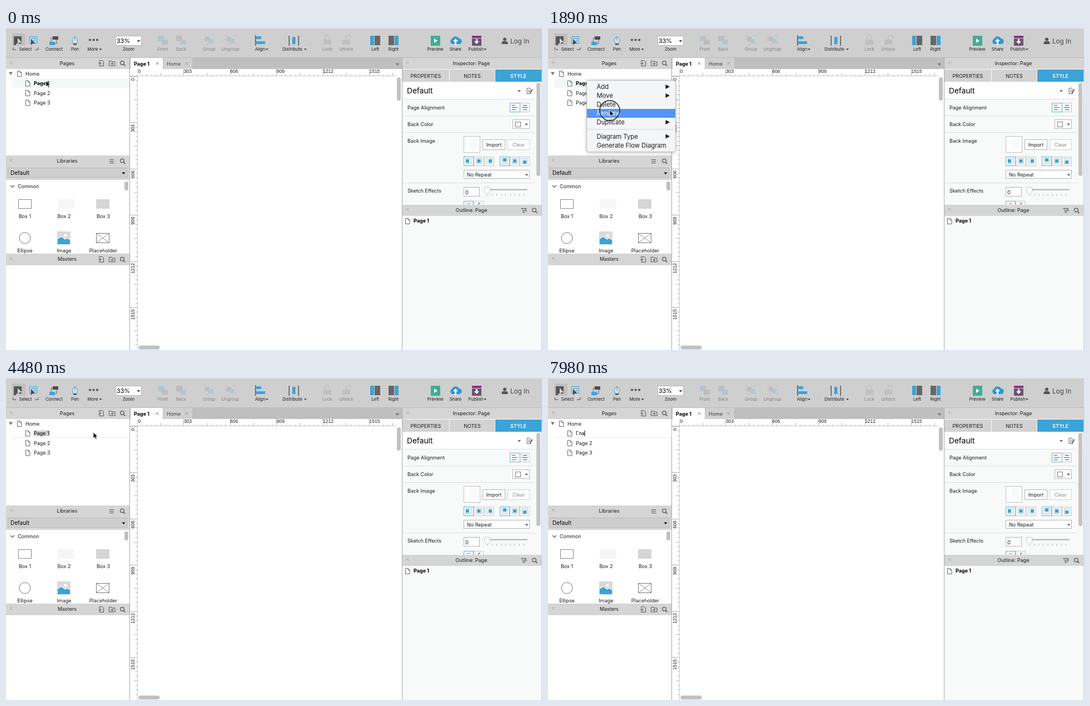
Write an HTML page that moves like this. It is 964 px wide and 581 px high and loops after 8 s.

```html
<!DOCTYPE html>
<html lang="en">
<head>
<meta charset="utf-8">
<title>Renaming a page</title>
<style>
  html, body { margin: 0; width: 100%; height: 100%; overflow: hidden; background: #fff; }
  svg { display: block; width: 964px; height: 581px; }
  text { font-family: Inter, "Open Sans", sans-serif; white-space: pre; }
  .ruler { font-family: "Liberation Sans", Arial, sans-serif; }
</style>
</head>
<body>
<svg id="stage" viewBox="0 0 964 581"></svg>
<script>
const INK = '#1c1c1c', BLUE = '#3ca3d7', BAND = '#d5d5d5', LINE = '#dedede', PANEL = '#f8f9f9';

const rect = (x, y, w, h, fill, extra = '') => `<rect x="${x}" y="${y}" width="${w}" height="${h}" fill="${fill}" ${extra}/>`;
const box = (x, y, w, h, fill, stroke, extra = '') => rect(x + .5, y + .5, w - 1, h - 1, fill, `stroke="${stroke}" ${extra}`);
const path = (d, stroke, width = 1, fill = 'none', extra = '') => `<path d="${d}" stroke="${stroke}" stroke-width="${width}" fill="${fill}" ${extra}/>`;
const shape = (d, fill) => `<path d="${d}" fill="${fill}"/>`;
const text = (x, y, s, size = 9, fill = INK, extra = '') => `<text x="${x}" y="${y}" font-size="${size}" fill="${fill}" ${extra}>${s}</text>`;
const mid = (x, y, s, size, fill, extra = '') => text(x, y, s, size, fill, `text-anchor="middle" ${extra}`);
const bold = (x, y, s) => text(x, y, s, 9, '#000', 'font-weight="700"');
const down = (x, y, w = 3, fill = '#444') => shape(`M${x - w} ${y - w / 2}h${2 * w}l${-w} ${w * 1.2}z`, fill);
const group = (body, extra) => `<g ${extra}>${body}</g>`;

const pageIcon = (x, y) => path(`M${x + .5} ${y + .5}h4.5l3 3v7h-7.5zM${x + 5} ${y + .5}v3h3`, '#666', 1, '#fff');
const search = (x, y) => `<circle cx="${x}" cy="${y}" r="3.3" fill="none" stroke="#555" stroke-width="1.3"/>` + path(`M${x + 2.5} ${y + 2.5}l3 3`, '#555', 1.6);
const collapse = (x, y) => path(`M${x + 5} ${y + 5}l-4.5 -4.5M${x} ${y + 4}v-4h4`, '#b0b0b0');
const addPage = (x, y) => path(`M${x + 2} ${y + 4}v-3.5h5l2.5 2.5v7.5h-7.5v-2M${x} ${y + 6}h6M${x + 3} ${y + 3.5}v5`, '#555');
const addFolder = (x, y) => path(`M${x + .5} ${y + 1.5}h4l1 1.5h5.5v7h-10.5zM${x + 3.5} ${y + 6.5}h5M${x + 6} ${y + 4}v5`, '#555');
const header = (x, y, w, h, title, cx) => rect(x, y, w, h, BAND) + mid(cx, y + 13, title, 9) + collapse(x + 8, y + 7);
const label = (x, s, fill = INK) => mid(x, 41, s, 7.8, fill);
const pointer = (x, y, fill) => shape(`M${x} ${y}v11l3 -3h4.5z`, fill);

function toolbar() {
  const dim = '#858585', paleBlue = '#b3c6d0', paleGray = '#bdbdbd';
  const stacked = (x, front) => rect(x - 9, 14, 11, 10, front ? paleBlue : paleGray) + rect(x - 2, 21, 11, 9, front ? paleGray : paleBlue);
  const cluster = x => rect(x - 7, 16, 8, 8, paleGray) + rect(x - 1, 20, 8, 8, paleBlue) +
    path(`M${x - 9} 14h18v16h-18z`, '#b8b8b8', 1, 'none', 'stroke-dasharray="3 12"');
  const lock = (x, open) => rect(x - 7, 21, 14, 9, '#c0c0c0') +
    path(`M${x - 4 + open} 21v-4a4 4 0 0 1 8 0v${4 - open / 2}`, '#c0c0c0', 1.5);
  const pane = (x, w, a, b) => rect(x, 14, w, 17, a) + rect(x + w + 1, 14, 17 - w, 17, b);
  return rect(0, 0, 964, 54, '#cfcfcf') + rect(0, 0, 964, 1, '#e4e4e4') + rect(0, 53, 964, 1, '#bababa') +
    rect(11, 10, 24, 22, '#c0c0c0', 'rx="2"') + rect(14, 15, 14, 13, '#555') + pointer(21, 18, '#d5d5d5') + rect(14, 28, 4, 3, '#555') +
    box(42, 15, 14, 13, '#c4d9e3', BLUE) + box(46, 18, 7, 6, 'none', BLUE) + pointer(45, 20, '#444') +
    path('M12.5 35v4h6M52 39h6v-4', '#444') + label(35, 'Select') +
    rect(84, 15, 10, 6, '#4d4d4d') + rect(78, 25, 10, 6, BLUE) + path('M84 18h-2.5v7M88 28h3v-7', '#666') + label(86.5, 'Connect') +
    path('M120.5 28l-1.5 -7 5 -6 5 6 -1.5 7zM124 16v7', BLUE, 1, '#d9e2e6') + rect(121, 28, 6, 2.5, '#555') + label(124, 'Pen') +
    [151, 157.5, 164].map(x => `<circle cx="${x}" cy="21.5" r="2.1" fill="#555"/>`).join('') + label(156, 'More') + down(170, 38.5, 2.5) +
    box(197, 14, 47, 18, '#fff', '#b5b5b5') + text(199, 27, '33%', 10.8, '#000') + down(238.5, 23.5, 3) + label(220.5, 'Zoom') +
    stacked(282, true) + label(282, 'Front', dim) + stacked(315, false) + label(315, 'Back', dim) +
    cluster(365) + label(365, 'Group', dim) + cluster(404) + label(403.5, 'Ungroup', dim) +
    rect(448, 13, 1.5, 19, '#555') + rect(450, 15, 9, 5, BLUE) + rect(450, 24, 16, 5, BLUE) + label(457, 'Align') + down(469.5, 38.5, 2.5) +
    rect(508.5, 14, 1.5, 18, '#555') + rect(525.5, 14, 1.5, 18, '#555') + rect(515, 16, 5.5, 13, BLUE) + label(515, 'Distribute') + down(538.5, 38.5, 2.5) +
    lock(578, 0) + label(578, 'Lock', dim) + lock(612, 4) + label(612, 'Unlock', dim) +
    pane(655, 7, BLUE, '#666') + label(664, 'Left') + pane(688, 10, '#666', BLUE) + label(697, 'Right') +
    rect(764, 14, 17, 18, '#3fae95') + shape('M770 19v8l6 -4z', '#fff') + label(772, 'Preview') +
    shape('M803 29a5 5 0 0 1 -.5 -9.5 6.5 6.5 0 0 1 12 -.5 5 5 0 0 1 .5 10z', '#2f97d3') + shape('M808.5 19l4.5 5h-3v7h-3v-7h-3z', '#fff') + label(808.5, 'Share') +
    rect(838, 14, 17, 4, '#92278f') + rect(838, 19, 17, 13, '#6a5370') + shape('M846.5 29l-4.5 -5h3v-4h3v4h3z', '#fff') + label(845, 'Publish') + down(861.5, 38.5, 2.5) +
    `<circle cx="897" cy="20.5" r="3" fill="#555"/>` + shape('M891.5 29v-2q0 -3 3 -3h5q3 0 3 3v2z', '#555') + text(907, 28, 'Log In', 11.7, '#444');
}

function leftPanels() {
  const tools = y => addPage(166, y + 4) + addFolder(185, y + 4) + search(209, y + 9);
  const items = [[34, 'Box 1', 'Ellipse'], [104.5, 'Box 2', 'Image'], [175, 'Box 3', 'Placeholder']];
  return rect(0, 54, 222, 527, '#fff') +
    header(0, 54, 222, 20, 'Pages', 110) + tools(54) +
    shape('M5 79.5h7l-3.5 5.5z', '#777') + pageIcon(20, 77) + text(35, 85.5, 'Home') +
    pageIcon(35, 112) + text(50, 120.5, 'Page 2') + pageIcon(35, 129.5) + text(50, 138, 'Page 3') +
    rect(0, 230, 222, 44, BAND) + header(0, 230, 222, 20, 'Libraries', 110) +
    path('M186 237.5h8M186 240.5h8M186 243.5h8', '#555') + search(209, 239.5) +
    box(3, 252, 215, 18, '#cecece', '#b8b8b8') + text(8, 265, 'Default', 10, '#000') + down(211.5, 262, 3, '#000') +
    path('M8 284l3.5 3.5 3.5 -3.5', '#555', 1.2) + text(21, 289, 'Common') +
    rect(213, 277, 7, 16, '#c1c1c1', 'rx="3"') +
    box(22, 309, 24, 17, '#fff', '#888') + rect(93, 309, 30, 17, '#f6f6f6') + rect(162, 309, 24, 17, '#d5d5d5') +
    `<circle cx="34" cy="379" r="10" fill="#fff" stroke="#777"/>` +
    rect(92, 367, 24, 24, '#d9d9d9') + `<circle cx="107" cy="374" r="2.6" fill="#fff"/>` +
    shape('M93 380l7 -4 6 5 4 -2 5 3v8h-22z', BLUE) + path('M93 380l7 -4 6 5 4 -2 5 3', '#fff', 1.3) +
    box(162, 370, 24, 18, '#fff', '#777') + path('M162.5 370.5l23 17M185.5 370.5l-23 17', '#777', .8) +
    items.map(([x, a, b]) => mid(x, 343, a, 9) + mid(x, 405, b, 9)).join('') +
    header(0, 407, 222, 21, 'Masters', 110) + tools(408) +
    rect(222, 54, 1, 527, '#a8a8a8');
}

function editor() {
  const unit = 83.4, major = [0, 1, 2, 3, 4, 5];
  let ticksX = '', ticksY = '';
  for (let i = 0; i < 60; i++) {
    const size = i % 10 === 0 ? 13 : i % 5 === 0 ? 6 : 3, at = i * unit / 10;
    if (at < 465) ticksX += `M${236.5 + Math.round(at)} 87v${-size}`;
    if (at < 488) ticksY += `M236 ${87.5 + Math.round(at)}h${-size}`;
  }
  return rect(223, 54, 490, 527, '#fff') + rect(223, 54, 490, 20, '#bfbfbf') +
    rect(224, 54, 58, 20, '#fff') + bold(230, 67.5, 'Page 1') + path('M269.5 61.5l5 5M274.5 61.5l-5 5', '#888') +
    rect(283, 54, 52, 20, '#d0d0d0') + text(289, 67.5, 'Home', 9, '#444') + path('M322 61.5l5 5M327 61.5l-5 5', '#999') +
    down(704, 65.5, 3.5, '#777') +
    path(ticksX + ticksY, '#b0b0b0') + path('M223 86.5h480M236.5 74v507', '#c8c8c8') +
    major.map(i => text(237.5 + i * unit - (i ? 1 : 0), 81, i * 303, 8.5, INK, 'class="ruler"') +
      `<text class="ruler" text-anchor="end" font-size="8.5" fill="${INK}" transform="translate(231 ${90.5 + i * unit}) rotate(-90)">${i * 303}</text>`).join('') +
    rect(703, 89, 7, 42, '#c1c1c1', 'rx="3.5"') + rect(238.5, 573, 38, 7, '#c1c1c1', 'rx="3.5"') +
    rect(712, 54, 1, 527, '#a8a8a8');
}

function inspector() {
  const edge = on => on ? '#62b3dc' : '#c8c8c8';
  const tab = (x, w, s, on) => rect(x, 75, w, 22, on ? BLUE : '#d2d2d2') + mid(x + w / 2, 89.5, s, 9, on ? '#fff' : INK, on ? 'font-weight="600"' : '');
  const divider = y => rect(713, y, 238, 1, LINE);
  const pad = (x, y, dx, dy, on) => box(x, y, 18, 17, PANEL, edge(on)) +
    box(x + 4, y + 3, 10, 10, '#fff', '#a8c4d2') + rect(x + 6 + dx, y + 5 + dy, 6, 6, BLUE);
  const slots = [-2, 0, 2];
  let ticks = '';
  for (let x = 866.5; x < 935; x += 8.1) ticks += `M${x} 299v4`;
  return rect(713, 54, 251, 265, PANEL) + header(713, 54, 251, 20, 'Inspector: Page', 837) + rect(713, 97, 251, 31, '#fff') +
    tab(713, 84, 'PROPERTIES') + tab(798, 81, 'NOTES') + tab(880, 83, 'STYLE', true) +
    text(721, 117.5, 'Default', 13.7, '#000') + down(923, 113.5, 3, '#666') +
    path('M937 108.5h5l2 2v8h-7zM939 112h3M939 114.5h3', '#666') + path('M942 117l5 -6', '#444', 1.3) +
    [128, 158, 188, 279].map(divider).join('') +
    text(722, 147, 'Page Alignment') + text(722, 177, 'Back Color') + text(722, 207, 'Back Image') + text(722, 297, 'Sketch Effects') +
    box(924, 135, 18, 17, PANEL, edge()) + box(906, 135, 19, 17, PANEL, edge(true)) +
    path('M910 139.5h6M910 143.5h10M910 147.5h7', '#256f99') + path('M930 139.5h7M928 143.5h10M930 147.5h7', '#555') +
    box(911, 165, 31, 17, '#fff', '#b5b5b5') + box(916, 169, 10, 10, '#fff', '#777') + down(936, 174, 3, '#666') +
    box(823, 195, 30, 30, '#fff', '#c0c0c0') + rect(834, 200, 14, 18, PANEL) +
    box(857, 201, 41, 19, '#fff', '#b5b5b5') + mid(877.5, 214, 'Import', 9) +
    box(902, 201, 40, 19, '#fff', '#d2d2d2') + mid(922, 214, 'Clear', 9, '#8b8b8b') +
    slots.map((d, i) => pad(823 + i * 18.5, 232, d, 0, !i) + pad(888 + i * 18, 232, 0, d, !i)).join('') +
    box(823, 256, 119, 16, '#fff', '#b5b5b5') + text(829, 268, 'No Repeat') + down(936.5, 265, 3, '#666') +
    box(823, 287, 29, 17, '#fff', '#b5b5b5') + text(826, 299.5, '0', 9.5) +
    rect(860, 290.5, 78, 2.5, '#bdbdbd', 'rx="1"') + path(ticks, '#b5b5b5') +
    path('M860.5 287.5h10v8l-5 5.5 -5 -5.5z', '#c8c8c8', 1, '#fff') +
    box(823, 312, 18, 9, PANEL, edge(true)) + box(841, 312, 18, 9, PANEL, edge()) +
    path('M829 317.5q3 -3 6 0', '#3fae95') + path('M850 319v-3h3', '#555') +
    rect(954, 99, 7, 168, '#c4c4c4', 'rx="3.5"') +
    rect(713, 319, 251, 262, PANEL) + header(713, 319, 251, 20, 'Outline: Page', 837) +
    path('M927 325.5h8l-3 4v4l-2 -1v-3zM936 326l-2 4h3', '#555') + search(950, 328.5) +
    pageIcon(718, 343) + bold(733, 351, 'Page 1') + rect(963, 54, 1, 527, '#c8c8c8');
}

const MENU = [['Add', 106, 1], ['Move', 122, 1], ['Delete', 138], ['Rename', 154], ['Duplicate', 170, 1], ['Diagram Type', 195.5, 1], ['Generate Flow Diagram', 211.5]];

const menu = () => box(69, 94, 161, 130, '#f4f5f6', '#b9b9b9', 'rx="4" style="filter:drop-shadow(0 2px 3px #0003)"') +
  `<rect id="hover" x="70" width="159" height="16" fill="#5595f5"/>` + rect(70, 182.5, 159, 1, '#d4d4d4') +
  MENU.map(([name, y, more]) => group(text(87.5, y + 4, name, 11.3, 'currentColor') +
    (more ? shape(`M211.5 ${y - 4}l7.5 4 -7.5 4z`, 'currentColor') : ''), 'class="item"')).join('');

const $ = id => document.getElementById(id);
$('stage').innerHTML = toolbar() + leftPanels() +
  rect(11, 91, 211, 17, '#f4f7f8', 'id="row"') +
  group(rect(11, 91, 211, 17, '#fff') + rect(11, 107, 211, 1, '#e9e9e9') + rect(222, 92, 1, 16, '#9cc9e6'), 'id="field"') +
  pageIcon(35, 94.5) + rect(49.5, 94.5, 30, 10.5, '#d2d2d2', 'id="selection"') +
  `<text id="name" x="50" y="103" font-size="9"></text>` + rect(50, 94.5, 1, 10.5, '#000', 'id="caret"') +
  editor() + inspector() + group(menu(), 'id="menu"') +
  `<circle id="ring" r="18" fill="none" stroke="#222" stroke-width="1.5"/>` +
  group(path('M0 0v11l2.6 -2.4 1.8 4 1.9 -.8 -1.8 -3.9h3.5z', '#fff', .9, '#000'), 'id="cursor"');

const LOOP = 8000, STEP = 70;
const MENU_OPEN = 1190, MENU_CLOSE = 2100, HIDE_CURSOR = 5460;
const CLICKS = [[1050, 1260], [1750, 2030]];
const TYPING = [[HIDE_CURSOR, ''], [6650, 'Г'], [7210, 'Гл'], [7700, 'Гла']];
const MOVES = [[0, 72, 95], [210, 72, 95], [700, 69, 98], [1260, 69, 98], [1680, 111, 148],
  [2100, 111, 148], [2520, 164, 149], [3640, 164, 149], [4200, 157, 98], [LOOP, 157, 98]];

function cursorAt(t) {
  const i = MOVES.findIndex(move => move[0] > t);
  const [t0, x0, y0] = MOVES[i - 1], [t1, x1, y1] = MOVES[i];
  const p = (t - t0) / (t1 - t0), e = p * p * (3 - 2 * p);
  return [x0 + (x1 - x0) * e, y0 + (y1 - y0) * e];
}

const show = (id, on) => $(id).style.display = on ? '' : 'none';
const items = document.querySelectorAll('.item');

function render(t) {
  const [x, y] = cursorAt(t);
  const open = t >= MENU_OPEN && t < MENU_CLOSE, editing = t >= MENU_CLOSE;
  const typed = TYPING.filter(key => key[0] <= t).pop();

  $('cursor').setAttribute('transform', `translate(${x} ${y})`);
  show('cursor', t < HIDE_CURSOR);
  $('ring').setAttribute('transform', `translate(${x} ${y + 1})`);
  show('ring', CLICKS.some(([from, to]) => t >= from && t < to));

  const active = x > 71 ? MENU.findIndex(item => Math.abs(item[1] - y) <= 8) : -1;
  show('menu', open);
  show('hover', active >= 0);
  if (active >= 0) $('hover').setAttribute('y', MENU[active][1] - 8);
  items.forEach((item, i) => item.style.color = i === active ? '#fff' : INK);

  show('row', !editing);
  show('field', editing);
  show('selection', editing && !typed);
  $('name').textContent = typed ? typed[1] : 'Page 1';
  $('name').setAttribute('font-weight', editing ? 400 : 700);
  show('caret', typed && (t - typed[0]) % 1000 < 500);
  if (typed) $('caret').setAttribute('x', 50 + (typed[1] ? $('name').getComputedTextLength() : 0));
}

function tick() {
  const t = performance.now() % LOOP;
  render(Math.floor(t / STEP) * STEP);
  requestAnimationFrame(tick);
}
tick();
</script>
</body>
</html>
```
